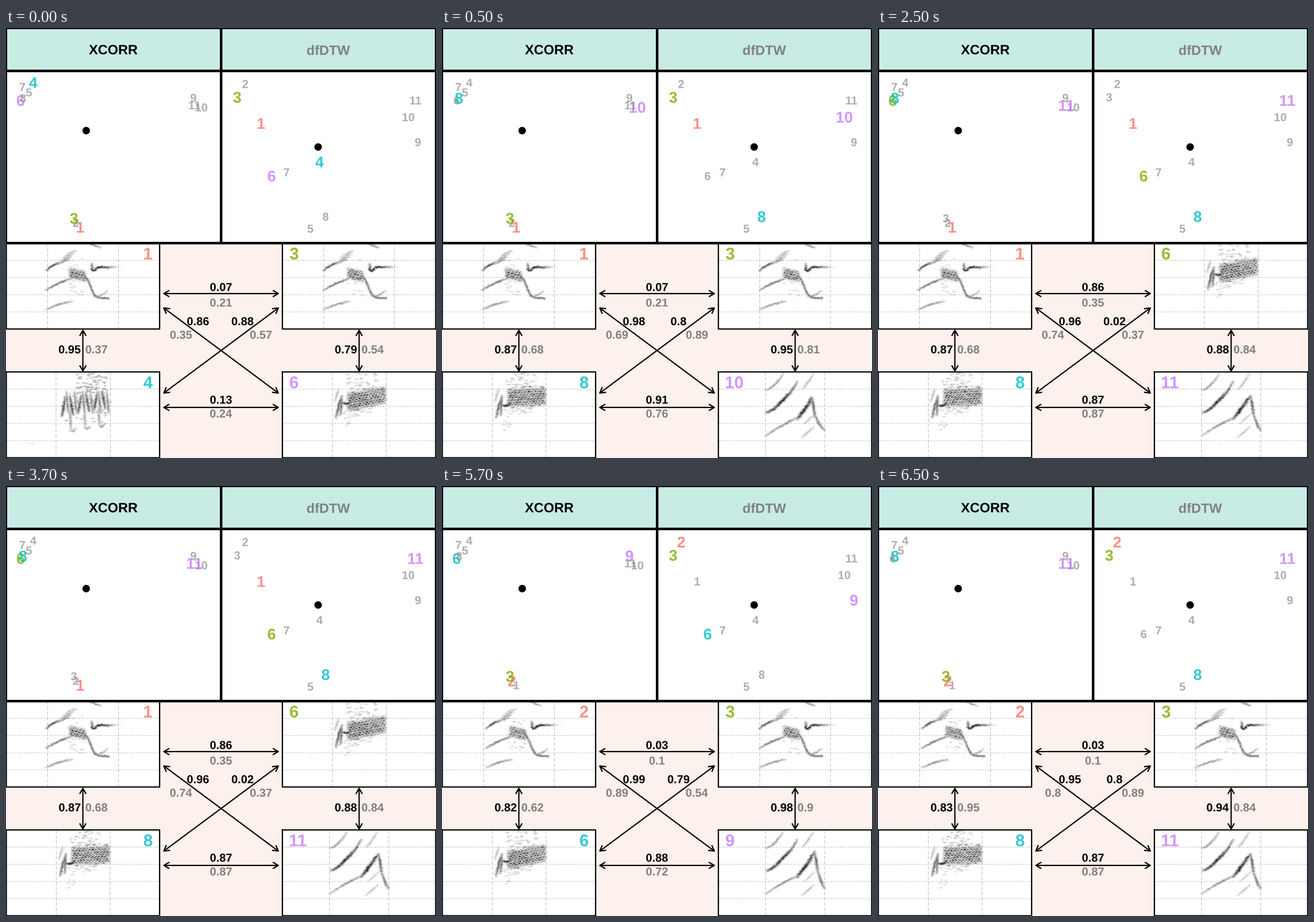
These frames come from a looping animation (748x748 px, 8000 ms). A matplotlib script:

```python
from itertools import product

import numpy as np
import matplotlib.pyplot as plt
from matplotlib.animation import FuncAnimation
from matplotlib.patches import Circle, PathPatch, Rectangle
from matplotlib.path import Path
from matplotlib.textpath import TextPath
from matplotlib.transforms import Affine2D

SIZE, DPI = 748, 64
PW, PH = 267, 149
PT = 72 / DPI  # points per pixel
BOLD = {"family": "Liberation Sans", "weight": "bold"}

MINT, PINK, MID_GREY, SOFT_GREY = "#c8ebe4", "#fcf1ec", "#808080", "#999999"
HUES = ["#F8766D", "#7CAE00", "#00BFC4", "#C77CFF"]

# map positions of syllables 1 to 11
XCORR = [(129.5, 346.5), (121.5, 339), (118, 331), (47.5, 95), (40, 112), (25.5, 126),
         (28.5, 102.5), (29.5, 122), (326, 121.5), (340, 138), (328, 134.5)]
DTW = [(444, 166), (416, 97.5), (402, 120.5), (545.5, 233), (529.5, 349), (462, 257.5),
       (488, 251), (556, 328), (716.5, 198.5), (700, 155), (712.5, 126)]

# pair: distance by each method
DIST = {(1, 3): (.07, .21), (1, 4): (.95, .37), (3, 6): (.79, .54),
        (1, 6): (.86, .35), (3, 4): (.88, .57), (4, 6): (.13, .24),
        (1, 8): (.87, .68), (3, 10): (.95, .81), (1, 10): (.98, .69),
        (3, 8): (.8, .89), (8, 10): (.91, .76), (6, 11): (.88, .84),
        (1, 11): (.96, .74), (6, 8): (.02, .37), (8, 11): (.87, .87),
        (2, 3): (.03, .1), (2, 6): (.82, .62), (3, 9): (.98, .9),
        (2, 9): (.99, .89), (6, 9): (.88, .72), (2, 8): (.83, .95),
        (3, 11): (.94, .84), (2, 11): (.95, .8)}

# syllables at top left, top right, bottom left, bottom right
SCENES = [(1, 3, 4, 6), (1, 3, 8, 10), (1, 6, 8, 11), (2, 3, 6, 9), (2, 3, 8, 11)]


class Spectrogram:
    """Ink density of one syllable, built from sweeps and textures."""

    def __init__(self, seed, limits):
        self.rng = np.random.default_rng(seed)
        self.limits = limits
        self.ink = np.zeros((PH, PW))
        self.yy, self.xx = np.mgrid[:PH, :PW] + 0.5

    def trace(self, xs, ys, levels, width=1.6):
        jitter = self.rng.normal(0, .45, (2, len(xs)))
        levels = levels * self.rng.uniform(.6, 1, len(xs))
        for x, y, level in zip(xs + jitter[0], ys + jitter[1], levels):
            gx = np.exp(-((self.xx[0] - x) / width) ** 2 / 2)
            gy = np.exp(-((self.yy[:, 0] - y) / width / .75) ** 2 / 2)
            np.maximum(self.ink, level * np.outer(gy, gx), out=self.ink)

    def sweep(self, start, end, dark, bow=0, width=1.6):
        """Tone gliding between two points, bowed downwards, loudest midway."""
        (x0, y0), (x1, y1) = start, end
        t = np.linspace(0, 1, int(np.hypot(x1 - x0, y1 - y0)) + 4)
        self.trace(x0 + (x1 - x0) * t, y0 + (y1 - y0) * t + 4 * bow * t * (1 - t),
                   dark * (.5 + .5 * np.sin(np.pi * t)), width)

    def patch(self, x0, x1, top, bottom, slope=0):
        """Soft-edged slanted band."""
        y = self.yy - slope * (self.xx - x0)
        edges = (self.xx - x0, x1 - self.xx, y - top, bottom - y)
        return np.prod([1 / (1 + np.exp(-e / 1.3)) for e in edges], axis=0)

    def weave(self, dark, *band, slope=0):
        """Rows of wavy dashes."""
        v = self.yy - slope * self.xx + .9 * np.sin(self.xx * 1.1)
        row = np.floor(v / 4.2)
        rows = .5 - .5 * np.cos(2 * np.pi * v / 4.2)
        dash = .65 + .35 * np.cos(self.xx * 1.1 + row * 2.4)
        cells = self.rng.uniform(.5, 1, (PH // 3 + 1, PW // 4 + 1))
        grain = cells.repeat(3, 0).repeat(4, 1)[:PH, :PW]
        ink = dark * self.patch(*band, slope) * (.3 + .7 * rows * dash) * grain
        np.maximum(self.ink, ink, out=self.ink)

    def flecks(self, dark, count, *band, slope=0):
        """Short faint dashes scattered over a band."""
        rows, cols = np.nonzero(self.patch(*band, slope) > .5)
        for k in self.rng.integers(0, len(rows), count):
            x, y, half = cols[k], rows[k], self.rng.uniform(1, 3.5)
            self.sweep((x - half, y), (x + half, y + slope * half),
                       dark * self.rng.uniform(.4, 1), width=1)

    def rgba(self):
        img = np.zeros((PH, PW, 4))
        img[..., 3] = np.clip(self.ink, 0, 1)
        return img


def song(seed, dx):
    s = Spectrogram(seed, (72, 195))
    # stack of rising tones on the left
    for k in range(3):
        y = 48 + 34 * k
        s.sweep((69 + dx, y), (113 - 20 * (k == 0) + dx, y - 20 + 6 * abs(k - 1)),
                .8 - .16 * k, -2, 1.5)
    for k in range(4):
        s.sweep((90 + 4 * k + dx, 37 - 5 * k), (109 + 4 * k + dx, 29 - 5 * k), .5 - .06 * k, -1, 1.3)
    s.sweep((146 + dx, 2), (164 + dx, 8), .5, 0, 1.3)
    # whistle that fades to the right
    x = np.arange(148, 205, .8)
    s.trace(x + dx, 42 + 6 * np.exp(-((x - 152) / 5) ** 2), .95 / (1 + np.exp((x - 181) / 6)))
    s.sweep((148 + dx, 36), (150 + dx, 47), .6)
    # step down, splitting at the end
    x = np.arange(135, 177, .6)
    fall = 55 + 41 / (1 + np.exp((146 - x) / 4))
    s.trace(x + dx, fall, .6, 1.5)
    s.sweep((152 + dx, 93), (176 + dx, 83), .4, 3, 1.3)
    s.weave(.95, 110 + dx, 138 + dx, 43, 61, slope=.25)
    s.flecks(.7, 22, 110 + dx, 138 + dx, 44, 60, slope=.25)
    s.flecks(.25, 20, 111 + dx, 137 + dx, 18, 85, slope=.4)
    return s


def chirp(seed, apex):
    x, y = apex
    s = Spectrogram(seed, (82, 185))
    s.sweep((83, 32), (112, 4), .45, 5, 1.5)
    s.sweep((84, 71), (107, 55), .85, 2.5, 1.9)
    s.sweep((97, 65), (126, 35), .95, 0, 2)
    s.sweep((119, 43), (137, 17), .6, 2, 1.6)
    s.sweep((146, 30), (165, 3), .3, 2, 1.4)
    s.sweep((83, 111), (142, 78), .5, -2, 1.5)
    s.sweep((137, 82), (161, 51), 1, 0, 2.1)
    s.sweep((155, 57), apex, .85, 0, 1.7)
    s.sweep(apex, (x + 6, y + 36), .7, -2, 1.6)
    s.sweep((x + 5, y + 30), (184, 102), .6, 3, 1.6)
    s.sweep((145, 114), (166, 96), .3, 0, 1.4)
    s.sweep((149, 90), (167, 74), .25, 0, 1.4)
    return s


def trill(seed):
    s = Spectrogram(seed, (86.5, 181))
    s.flecks(.55, 90, 121, 174, 0, 55)
    s.flecks(.4, 50, 98, 182, 36, 88)
    # row of bars with pale hooks below
    for k in range(6):
        x, lean = 99 + 14 * k, 3 * (-1) ** k
        s.sweep((x - lean, 78 - 3 * k), (x + lean, 44 - 2 * k), .8, 2, 1.7)
        s.sweep((x + 5, 34), (x + 9, 72), .55, 2, 1.5)
    for k in range(3):
        x = 110 + 25 * k
        s.sweep((x, 60), (x + 2, 102 - 4 * k), .4)
        s.sweep((x + 1, 101 - 4 * k), (x + 10, 99 - 4 * k), .45, 3)
    s.sweep((33, 125), (50, 124), .1, 0, 1.2)
    return s


def buzz(seed, slope, top, bottom):
    s = Spectrogram(seed, (87, 180.5))
    s.weave(.95, 113, 179, top, bottom, slope=slope)
    s.flecks(.75, 60, 115, 177, top - 4, bottom + 3, slope=slope)
    s.flecks(.35, 45, 112, 165, 4, top, slope=slope)
    s.flecks(.3, 25, 113, 155, bottom, bottom + 14, slope=slope)
    # stem with a loud notch before the buzz
    s.sweep((93, 80), (103, 44), .75, -2, 1.6)
    s.sweep((91, 52), (98, 30), .3, 0, 1.4)
    s.sweep((103, 42), (101, 76), .65, 0, 1.6)
    s.sweep((104, 53 + 40 * (.2 - abs(slope))), (119, 53), 1, 3, 1.6)
    s.flecks(.25, 12, 106, 119, 60, 102)
    return s


SOUNDS = {1: song(1, 0), 2: song(2, 7), 3: song(3, 3), 4: trill(4),
          6: buzz(6, -.2, 39, 68), 8: buzz(8, -.06, 32, 61),
          9: chirp(9, (167, 39)), 10: chirp(10, (162, 44)), 11: chirp(11, (167, 42))}
IMAGES = {n: s.rgba() for n, s in SOUNDS.items()}

fig = plt.figure(figsize=(SIZE / DPI, SIZE / DPI), dpi=DPI, facecolor="white")
ax = fig.add_axes([0, 0, 1, 1])


def line(xs, ys, width, color="black", **style):
    ax.plot(xs, ys, color=color, lw=width * PT, snap=False, **style)


def box(x0, y0, x1, y1, color):
    ax.add_patch(Rectangle((x0, y0), x1 - x0, y1 - y0, color=color, lw=0))


def label(x, y, text, size, color, anchor=.5, alpha=1):
    """Bold text centred on y; anchor 0, .5 or 1 puts x at its left, middle or right."""
    glyphs = TextPath((0, 0), text, size=size, prop=BOLD)
    ink = glyphs.get_extents()
    place = Affine2D().translate(-ink.x0 - anchor * ink.width, -.35 * size).scale(1, -1)
    ax.add_patch(PathPatch(place.translate(x, y).transform_path(glyphs),
                           color=color, lw=0, alpha=alpha, zorder=3))


def arrow(start, end):
    start, end = np.array(start), np.array(end)
    line(*zip(start, end), 2.2, solid_capstyle="butt")
    angle = np.arctan2(*(end - start)[::-1])
    for tip, a in ((start, angle), (end, angle + np.pi)):
        wings = [tip + 10 * np.array([np.cos(a + w), np.sin(a + w)])
                 for w in (-np.pi / 6, np.pi / 6)]
        line(*zip(wings[0], tip, wings[1]), 2.2, solid_joinstyle="round")


def scatter(places, dot, chosen):
    for n, (x, y) in enumerate(places, 1):
        picked = n in chosen
        color = HUES[chosen.index(n)] if picked else SOFT_GREY
        label(x, y, str(n), 27 if picked else 20, color, alpha=.8)
    ax.add_patch(Circle(dot, 6.5, color="black", lw=0))


def panel(x, y, n, hue):
    right, bottom = x + 266.7, y + 149.3
    box(x, y, right, bottom, "white")
    for k in range(1, 5):
        line([x, right], [y + 29.9 * k] * 2, 1, "#bcbcbc", ls=(0, (3, 2)))
    for v in SOUNDS[n].limits:
        line([x + v] * 2, [y, bottom], 1, "#bcbcbc", ls=(0, (6, 3)))
    ax.imshow(IMAGES[n], extent=(x, x + PW, y + PH, y), aspect="auto",
              interpolation="nearest", zorder=2)
    line([x, right, right, x, x], [y, y, bottom, bottom, y], 2.2)
    if x < SIZE / 2:
        label(247.2, y + 18, str(n), 29.5, hue, alpha=.8)
    else:
        label(493.8, y + 18, str(n), 29.5, hue, 0, .8)


def values(pair, black, grey, anchors=(.5, .5)):
    for value, spot, color, anchor in zip(DIST[pair], (black, grey), ("black", MID_GREY), anchors):
        label(*spot, f"{value:g}", 20, color, anchor)


def draw(i):
    ax.clear()
    ax.axis("off")
    # the first scene shows for one step, the others for four
    chosen = SCENES[(i + 3) // 4]
    tl, tr, bl, br = chosen

    box(0, 0, SIZE, 75, MINT)
    box(0, 374, SIZE, SIZE, PINK)
    label(186.5, 37.5, "XCORR", 23.5, "black")
    label(561, 38.5, "dfDTW", 23.5, MID_GREY)
    scatter(XCORR, (139.5, 178.5), chosen)
    scatter(DTW, (543, 207), chosen)

    for (y, x), n, hue in zip(product((374.3, 598.3), (.5, 480.8)), chosen, HUES):
        panel(x, y, n, hue)

    for edge, width in ((.5, 3), (374.2, 4.4), (747.5, 3)):
        line([edge, edge], [0, 374], width)
    for edge, width in ((.5, 3), (74.7, 4.4), (374.2, 4.4)):
        line([0, SIZE], [edge, edge], width)

    for y in (462, 660):
        arrow((274.5, y), (473.7, y))
    for x in (133.7, 614.3):
        arrow((x, 526), (x, 596.5))
    arrow((274.5, 487), (473.7, 635))
    arrow((473.7, 487), (274.5, 635))

    values((tl, tr), (374, 450.5), (374, 477.5))
    values((bl, br), (374, 646.5), (374, 670.5))
    values((tl, br), (334, 510), (304.5, 533.5))
    values((tr, bl), (411.5, 510), (443.5, 533.5))
    values((tl, bl), (129.5, 559), (138.7, 559), (1, 0))
    values((tr, br), (610, 559), (619, 559), (1, 0))

    ax.set_xlim(0, SIZE)
    ax.set_ylim(SIZE, 0)
    return []


anim = FuncAnimation(fig, draw, frames=16, interval=500, repeat=True, blit=False)
plt.show()
```
